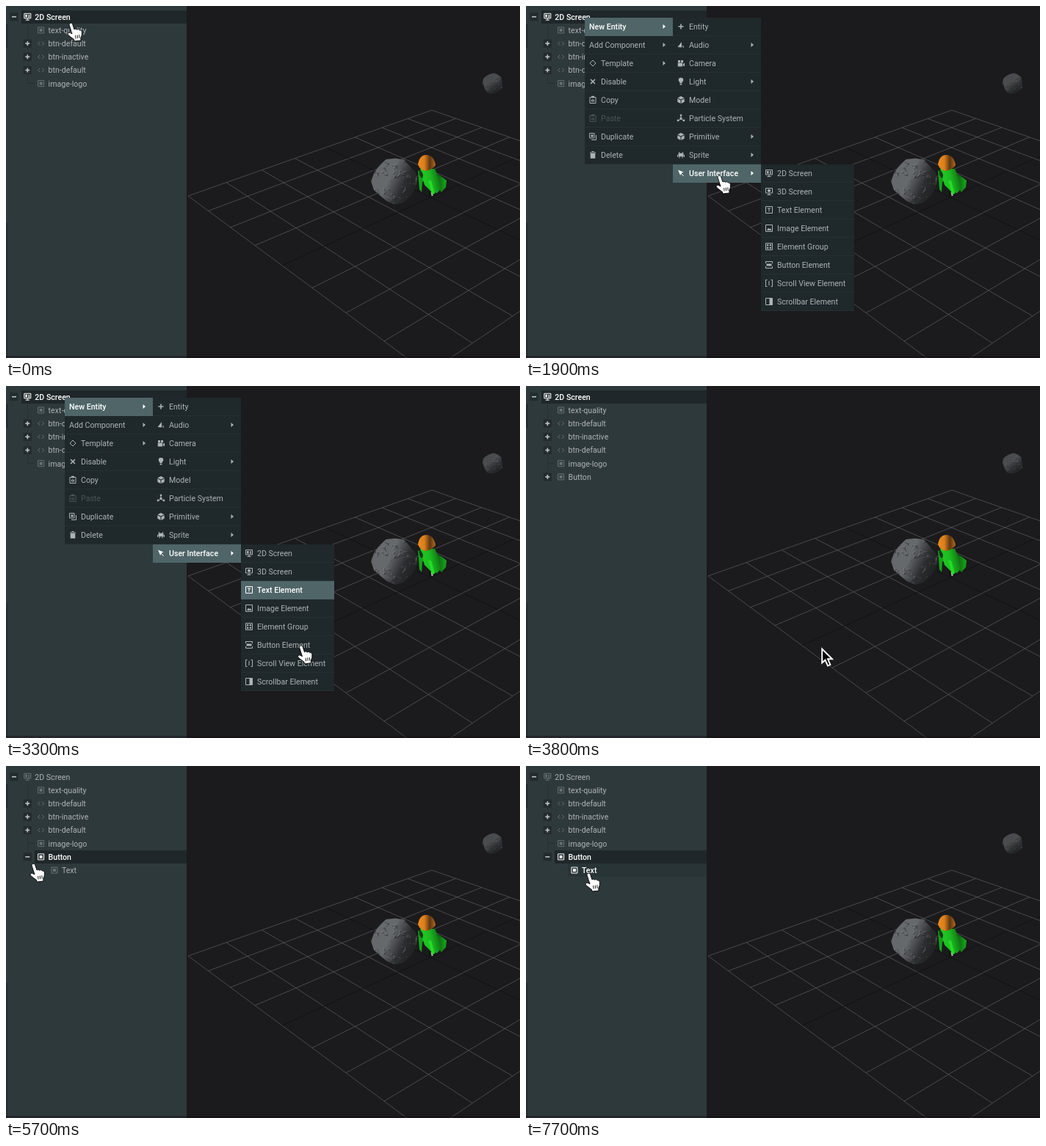
Recreate the animation shown at these times as an HTML page with a canvas. Size 700 px wide and 480 px high, loop 7.8 s.

```html
<!DOCTYPE html>
<html>
<head>
<meta charset="utf-8">
<style>
  html, body { margin: 0; width: 100%; height: 100%; overflow: hidden; background: #1b1a1c; }
  canvas { display: block; }
</style>
</head>
<body>
<canvas id="stage" width="700" height="480"></canvas>
<script>
const LOOP = 7800, STEP = 100, ROW = 25;
const stage = document.getElementById('stage').getContext('2d');
let g = stage;

const TEXT = '#adb4b6', DIM = '#687375', MENU = '#1f282b', HOT = '#4f6568', DARK = '#1f272a', RULE = '#263033';

// ---- icons: [outline, solid] path data around 0,0 ----
const box = (w, h = w, x = 0, y = 0) => `M${x - w / 2} ${y - h / 2}h${w}v${h}h${-w}z`;
const FRAME = box(9), MONITOR = box(9, 6.5, 0, -1.2) + 'M-2.5 4.5h5M0 2v2';
const TILES = [-1, 1].map(x => [-1, 1].map(y => box(2.3, 2.3, 1.9 * x, 1.9 * y)).join('')).join('');
const ICONS = {
  screen: [MONITOR, box(2.6, 3.5, -1.7, -1.2) + box(2, 1.5, 2, -2) + box(2, 1.5, 2, 0)],
  screen3d: [MONITOR, 'M0-3.3l2 1.1v2l-2 1.1l-2-1.1v-2z'],
  element: [box(8), box(4)],
  code: ['M-1.5-2.5L-4 0L-1.5 2.5M1.5-2.5L4 0L1.5 2.5', ''],
  plus: ['M-3.5 0h7M0-3.5v7', ''],
  cross: ['M-3-3l6 6M3-3l-6 6', ''],
  audio: ['', 'M-4.5 3L1-4V3.5zM2 0l2.5 3.5h-2z'],
  camera: ['', box(6.5, 5, -1, 2) + box(3, 3, -2.5, -2.5) + box(3, 3, 1.5, -2.5) + 'M3 1l2-1.5v5L3 3z'],
  light: ['', 'M-1.5 2C-1.5 0-3.3 0-3.3-2A3.3 3.3 0 0 1 3.3-2C3.3 0 1.5 0 1.5 2z' + box(2.8, 1.8, 0, 3.6)],
  cube: ['', 'M0-5L4.5-2.7L0-.5L-4.5-2.7zM-4.7-1.8L-.5.4V5L-4.7 2.8zM4.7-1.8L.5.4V5L4.7 2.8z'],
  particles: ['M0 0V-3M0 1l-3 2M0 1l3 2', box(3, 3, 0, .5) + box(2.4, 2.4, 0, -4) + box(2.4, 2.4, -4, 3) + box(2.4, 2.4, 4, 3)],
  sprite: ['M-3-4l1.5 2M3-4l-1.5 2M-4.5 0v3M4.5 0v3M-2 2v2.5M2 2v2.5', box(7, 4.5)],
  pointer: ['M0 0l3.7 4', 'M-4-4.5L3.5-1.5L.6-.2L-.8 3z'],
  template: ['M0-4L4 0L0 4L-4 0z', ''],
  copy: [box(8, 8, 0, .5) + box(3, 2, 0, 1), box(4, 2.5, 0, -4)],
  duplicate: [box(6.5, 6.5, -1.2, -1.2) + 'M-2 4.5h6.5v-6.5', box(3, 3, -1, -1)],
  trash: ['M-4-3h8M-1.5-4.5h3', box(6.6, 6.8, 0, 1.4)],
  text: [FRAME + 'M-2-2h4M0-2v4.5', ''],
  image: [FRAME, 'M-3 3L-1-.5L.5 1.5L1.7 0L3.5 3z'],
  group: [FRAME, TILES],
  button: ['M-4.5-2v-2.5h9v2.5M-4.5 2v2.5h9v-2.5', box(7, 3)],
  scrollview: ['M-2.5-4.5h-2v9h2M2.5-4.5h2v9h-2M0-3v6', ''],
  scrollbar: [FRAME, box(4, 9, 2.5)],
};
for (const k in ICONS) ICONS[k] = ICONS[k].map(d => new Path2D(d));

// Menu rows: [icon, label, has submenu, disabled]
const MAIN = [
  ['', 'New Entity', 1], ['', 'Add Component', 1], ['template', 'Template', 1], ['cross', 'Disable'],
  ['copy', 'Copy'], ['copy', 'Paste', 0, 1], ['duplicate', 'Duplicate'], ['trash', 'Delete'],
];
const ENTITY = [
  ['plus', 'Entity'], ['audio', 'Audio', 1], ['camera', 'Camera'], ['light', 'Light', 1], ['cube', 'Model'],
  ['particles', 'Particle System'], ['cube', 'Primitive', 1], ['sprite', 'Sprite', 1], ['pointer', 'User Interface', 1],
];
const PRIMITIVE = ['Box', 'Capsule', 'Cone', 'Cylinder', 'Plane', 'Sphere'].map(n => ['cube', n]);
const UI = [
  ['screen', '2D Screen'], ['screen3d', '3D Screen'], ['text', 'Text Element'], ['image', 'Image Element'],
  ['group', 'Element Group'], ['button', 'Button Element'], ['scrollview', 'Scroll View Element'], ['scrollbar', 'Scrollbar Element'],
];

// ---- drawing helpers ----
function rect(x, y, w, h, color) { g.fillStyle = color; g.fillRect(x, y, w, h); }

function shape(d, fill) { g.fillStyle = fill; g.fill(new Path2D(d)); }

function blend(x0, y0, x1, y1, ...colors) {
  const shade = g.createLinearGradient(x0, y0, x1, y1);
  colors.forEach((c, i) => shade.addColorStop(i / (colors.length - 1), c));
  return shade;
}

function label(s, x, cy, color) {
  g.font = (color === '#fff' ? '500 ' : '') + '10.6px Roboto, sans-serif';
  g.fillStyle = color;
  g.fillText(s, x, cy + 3.8);
}

function icon(name, x, y, color) {
  const [line, solid] = ICONS[name];
  g.save();
  g.translate(x, y);
  g.strokeStyle = g.fillStyle = color;
  g.lineWidth = name === 'cross' || name === 'plus' ? 1.6 : 1;
  g.stroke(line);
  g.fill(solid);
  g.restore();
}

// ---- 3D viewport ----
function project(u, v) {
  const w = 1 + 0.0375 * v - 0.04437 * u;
  return [(248 + 63.25 * v + 15.29 * u) / w, (259 - 9.3 * v + 8.01 * u) / w];
}

function grid() {
  const line = (a, b, color) => {
    g.beginPath(); g.moveTo(...a); g.lineTo(...b);
    g.strokeStyle = color; g.lineWidth = 0.8; g.stroke();
  };
  for (let i = 0; i <= 8; i++) {
    const color = i === 4 ? '#111012' : '#565657';
    line(project(i, 0), project(i, 8), color);
    line(project(0, i), project(8, i), color);
  }
}

function rock(x, y, scale, angle, light) {
  let seed = 23;
  const rnd = () => (seed = seed * 16807 % 2147483647) / 2147483647;
  const spread = r => (rnd() - 0.5) * 2 * r;
  g.save();
  g.translate(x, y);
  g.scale(scale, scale);
  g.rotate(angle);
  g.beginPath();
  for (let i = 0; i < 16; i++) {
    const a = i * Math.PI / 8, r = 31 + 1.5 * Math.cos(4 * a) + spread(1.5);
    g.lineTo(r * Math.cos(a), r * Math.sin(a));
  }
  g.fillStyle = blend(-26, -16, 32, 12, light, light, '#2b2d2f', '#1d1e1f');
  g.fill();
  g.clip();
  // Chips: a dark facet with a lit edge on its upper left
  for (let i = 0; i < 90; i++) {
    const cx = spread(33), cy = spread(33), r = 2 + rnd() * 6;
    const tri = [0, 1, 2].map(() => [cx + spread(r), cy + spread(r)]);
    for (const [shift, color] of [[-1, 'rgba(170,176,180,.25)'], [0, 'rgba(24,25,27,.42)']]) {
      g.beginPath();
      tri.forEach(([px, py]) => g.lineTo(px + shift, py + shift));
      g.fillStyle = color;
      g.fill();
    }
  }
  g.restore();
}

function rocket() {
  shape('M586 228L595 234L600 238L599 247L593 254L587 246z', blend(586, 0, 600, 0, '#0c5a10', '#18a81b'));
  shape('M561 224Q568 228 570 238L567 240L566 254L563 250z', '#15a019');
  shape('M576 253h10l-2 6h-7z', '#0f1010');
  shape('M578.5 254h3v5h-2z', '#b4b4b4');
  shape('M564 222L584 222Q590 234 592 250L587 255L580 254L570 244z', blend(564, 238, 592, 232, '#21cf25', '#1cb820', '#0d6a11'));
  shape('M575 238L579 238L584 256L580 257z', '#23dd27');
  shape('M563 224q3 0 5 6q0 6-3 4q-3-4-2-10z', '#173a1c');
  shape('M561 216Q563 203 573 203Q583 204 585 217Q581 223 572 225Q564 224 561 216z',
    blend(562, 0, 585, 0, '#e88a1e', '#dc7f1a', '#5c3714', '#b96a18'));
}

const backdrop = document.createElement('canvas');
backdrop.width = 700;
backdrop.height = 480;
g = backdrop.getContext('2d');
rect(0, 0, 700, 480, '#1b1a1c');
grid();
rock(530, 239, 1, 0, '#65696c');
rock(663, 106, 0.45, 0.5, '#4a4c4e');
rocket();
rect(0, 0, 246, 480, '#2e393b');
rect(0, 24, 2, 33, '#20292b');
rect(0, 296, 2, 184, '#232c2e');
rect(0, 477, 700, 3, 'rgba(15,8,16,.35)');
g = stage;

// ---- hierarchy panel ----
function toggle(x, y, open) {
  rect(x - 5.5, y - 5.5, 11, 11, '#222b2e');
  rect(x - 3, y - 0.8, 6, 1.6, '#bcc3c5');
  if (!open) rect(x - 0.8, y - 3, 1.6, 6, '#bcc3c5');
}

function treeRow(i, depth, name, kind, state, toggler) {
  const x = 11 + 18.3 * depth, y = 14.7 + 18.2 * i, lit = state !== '';
  if (lit) rect(Math.round(x + 9.5), Math.round(y - 9), 246 - Math.round(x + 9.5), 18, state === 'selected' ? DARK : '#293437');
  if (toggler) toggle(x, y, toggler === 'open');
  icon(kind, x + 18.3, y, lit ? '#fff' : DIM);
  label(name, x + 28.3, y, lit ? '#fff' : TEXT);
}

function tree(t) {
  const created = t >= 3800, chosen = t >= 3900, open = t >= 5400;
  rect(29, 24, 1, created ? 100 : 82, RULE);
  rect(29, 105, 10, 1, RULE);
  treeRow(0, 0, '2D Screen', 'screen', chosen ? '' : 'selected', 'open');
  treeRow(1, 1, 'text-quality', 'element', '');
  ['btn-default', 'btn-inactive', 'btn-default'].forEach((name, i) => treeRow(i + 2, 1, name, 'code', '', 'closed'));
  treeRow(5, 1, 'image-logo', 'element', '');
  if (created) treeRow(6, 1, 'Button', 'element', chosen ? 'selected' : '', open ? 'open' : 'closed');
  if (open) treeRow(7, 2, 'Text', 'element', t >= 6100 ? 'hover' : '');
}

// ---- context menus ----
function menu(x, y, w, rows, active) {
  rect(x, y, w, rows.length * ROW, MENU);
  rows.forEach(([glyph, name, more, disabled], i) => {
    const top = y + i * ROW, cy = top + 12.3, hot = i === active;
    const color = hot ? '#fff' : disabled ? '#4a5558' : TEXT;
    if (hot) rect(x, top, w, ROW, HOT);
    else rect(x, top + ROW - 1, w, 1, RULE);
    if (glyph) icon(glyph, x + 11, cy - 0.3, color);
    label(name, x + (glyph ? 22 : 6), cy, color);
    if (more) shape(`M${x + 106.5} ${cy - 3.3}l3.5 3l-3.5 3z`, color);
  });
}

function menus(t) {
  if (t < 800 || t >= 3800) return;
  menu(80, 16, 120, MAIN, t >= 900 ? 0 : -1);
  if (t < 900) return;
  // Hover trails the cursor by two steps
  const [x, y] = cursorAt(t - 2 * STEP);
  const rowAt = (left, top) => x < left ? -1 : Math.floor((y - top - 15) / ROW);
  const entity = t >= 1900 ? 8 : rowAt(200, 16);
  menu(200, 16, 120, ENTITY, entity);
  if (entity === 6) menu(320, 166, 127, PRIMITIVE, -1);
  if (entity === 8) menu(320, 216, 127, UI, rowAt(320, 216));
}

// ---- cursor: [start, end, x, y] of each move ----
const MOVES = [
  [1000, 1200, 191, 15], [1200, 1600, 258, 192], [1800, 1900, 263, 232], [2200, 2900, 397, 258],
  [2900, 3400, 402, 366], [3400, 3600, 402, 356], [4100, 4900, 37, 134], [5700, 6400, 73, 148], [7200, 7700, 85, 147],
];
const ease = k => k * k * (3 - 2 * k);

function cursorAt(t) {
  let x = 88, y = 24;
  for (const [from, to, x1, y1] of MOVES) {
    const k = ease(Math.min(1, Math.max(0, (t - from) / (to - from))));
    x += (x1 - x) * k;
    y += (y1 - y) * k;
  }
  return [x, y];
}

const ARROW = new Path2D('M1.2 2.6V21.5L5.5 17.5L9 25.5L12.4 24L9 16.3H15z');
const HAND = new Path2D('M2 2.5C2.5-.5 6-.5 6.7 2L9 9Q11 7 12.6 9.3Q15 7.5 16.2 10Q19 9 19.4 12Q20 17 17.8 20.5L18 24L9 25L8.5 22.5Q4 19.5.2 16Q0 12 3.5 13.6L6 15z');
const FINGERS = new Path2D('M10.6 17l.5 4.5M13.2 16.6l.4 4.5M15.8 16.2l.3 4.5');

function cursor(t) {
  const [x, y] = cursorAt(t);
  const arrow = t >= 900 && t < 1300 || t >= 3800 && t < 5000;
  const body = arrow ? ARROW : HAND;
  g.save();
  g.translate(arrow ? x : x - 4, arrow ? y : y - 1);
  g.fillStyle = arrow ? '#000' : '#fff';
  g.strokeStyle = arrow ? '#fff' : '#000';
  g.lineWidth = arrow ? 1.9 : 0.9;
  g.fill(body);
  g.stroke(body);
  if (!arrow) g.stroke(FINGERS);
  g.restore();
}

function draw(t) {
  g.drawImage(backdrop, 0, 0);
  tree(t);
  menus(t);
  cursor(t);
}

const start = performance.now();
function tick() {
  const t = (performance.now() - start) % LOOP;
  draw(Math.floor(t / STEP) * STEP);
  requestAnimationFrame(tick);
}
tick();
</script>
</body>
</html>
```
